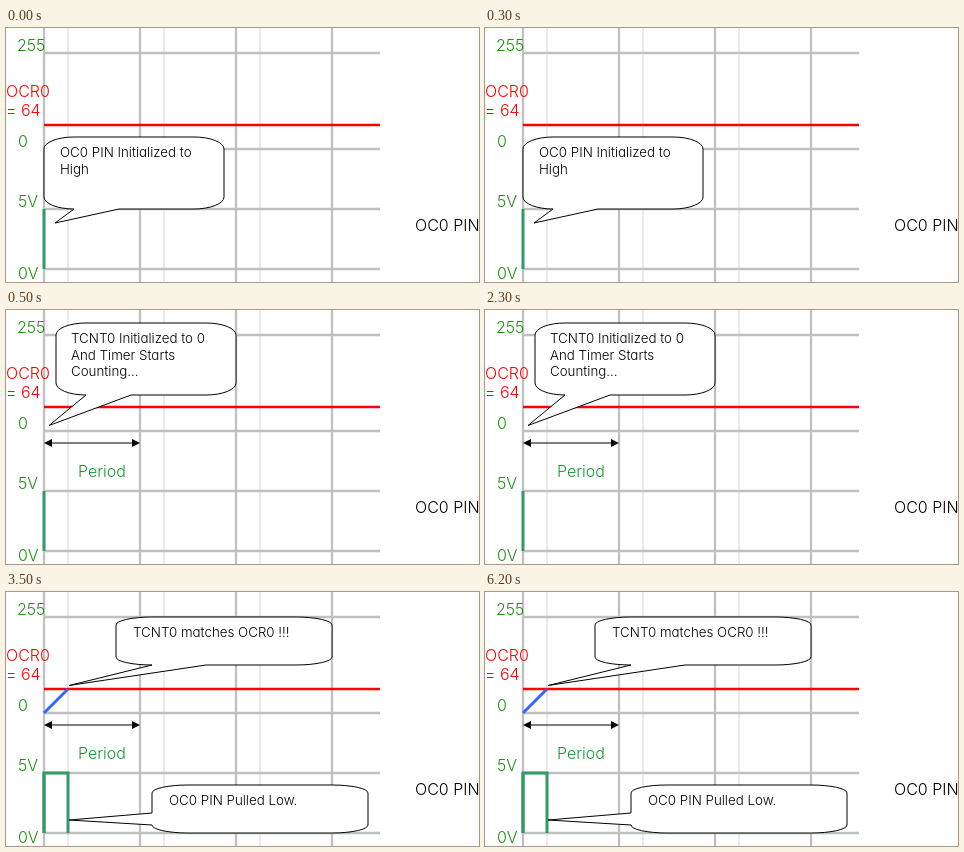
Recreate the animation shown at these times as an HTML page. Size 473 by 254 pixels, loop 8 s.

```html
<!DOCTYPE html>
<html lang="en">
<head>
<meta charset="utf-8">
<title>Timer compare match</title>
<style>
html, body { margin: 0; width: 100%; height: 100%; overflow: hidden; background: #fff; }
svg { display: block; width: 473px; height: 254px; }
text { font: 300 16px Inter, Lato, sans-serif; font-feature-settings: "cv11"; }
.axis { fill: #1f900f; }
.red { fill: #f00; }
.period { fill: #149a34; }
.note { font-size: 13.33px; }
.bubble { fill: #fff; stroke: #000; }
.signal { fill: none; stroke: #339966; stroke-width: 3; }
</style>
</head>
<body>
<svg id="stage" viewBox="0 0 473 254"></svg>
<script>
const LOOP = 8000;
const STEPS = { init: [0, 500], count: [500, 3500], match: [3500, 8000], period: [500, 8000] };

const stage = document.getElementById('stage');

function add(parent, tag, attrs, content = '') {
  const node = document.createElementNS('http://www.w3.org/2000/svg', tag);
  for (const [key, value] of Object.entries(attrs)) node.setAttribute(key, value);
  node.textContent = content;
  return parent.appendChild(node);
}
const line = (parent, d, stroke, width) =>
  add(parent, 'path', { d, stroke, 'stroke-width': width, fill: 'none' });
const label = (parent, x, y, content, cls = '') =>
  add(parent, 'text', { x, y, class: cls }, content);

// Rounded callout whose tail leaves the bottom or the left side.
function callout(parent, x, y, w, h, tip, side, rows) {
  const rx = w / 6, ry = h / 6;
  const tail = `L${tip}`;
  const bottom = side === 'bottom' ? `H${x + w * 5 / 12}${tail}L${x + rx},${y + h}` : `H${x + rx}`;
  const left = side === 'left' ? `V${y + h * 5 / 6}${tail}L${x},${y + h * 7 / 12}` : '';
  const arc = (dx, dy) => `a${rx},${ry} 0 0 1 ${dx},${dy}`;
  add(parent, 'path', {
    class: 'bubble',
    d: `M${x + rx},${y}H${x + w - rx}${arc(rx, ry)}V${y + h - ry}${arc(-rx, ry)}` +
       `${bottom}${arc(-rx, -ry)}${left}V${y + ry}${arc(rx, -ry)}Z`
  });
  for (const [tx, ty, content] of rows) label(parent, tx, ty, content, 'note');
}

// Grid and fixed labels
for (let i = 0; i < 3; i++) line(stage, `M${62 + i * 96},0V254`, '#e3e3e3', 1.5);
for (let i = 0; i < 4; i++) line(stage, `M${38 + i * 96},0V254`, '#c0c0c0', 2.3);
for (const y of [25, 121, 181, 241]) line(stage, `M38,${y}H374`, '#c0c0c0', 2.3);
line(stage, 'M38,97H374', '#f00', 2.3);
add(stage, 'path', { class: 'signal', d: 'M38,181V241' });
label(stage, 11, 23, '255', 'axis');
label(stage, 12, 119, '0', 'axis');
label(stage, 12, 179, '5V', 'axis');
label(stage, 12, 251, '0V', 'axis');
label(stage, 0, 69, 'OCR0', 'red');
label(stage, 0, 88, '= 64', 'red');
label(stage, 409, 203, 'OC0 PIN');

const groups = {};
for (const name of ['period', 'init', 'count', 'match']) groups[name] = add(stage, 'g', {});
const { period, init, count, match } = groups;

line(period, 'M42,133H130', '#000', 1);
add(period, 'path', { d: 'M38,133l8,-4v8ZM134,133l-8,-4v8Z' });
label(period, 72, 167, 'Period', 'period');

callout(init, 38, 109, 180, 72, '49,195', 'bottom', [
  [54, 129, 'OC0 PIN Initialized to'],
  [54, 146, 'High']
]);

callout(count, 50, 13, 180, 72, '43,115.5', 'bottom', [
  [65, 33, 'TCNT0 Initialized to 0'],
  [65, 50, 'And Timer Starts'],
  [65, 66, 'Counting…']
]);

add(match, 'path', { class: 'signal', d: 'M38,241V181H62V241' });
line(match, 'M38,121L62,97', '#3366ff', 3);
callout(match, 110, 25, 216, 48, '63,93.5', 'bottom', [
  [127, 45, 'TCNT0 matches OCR0 !!!']
]);
callout(match, 146, 193, 216, 48, '63,228', 'left', [
  [163, 213, 'OC0 PIN Pulled Low.']
]);

const start = performance.now();
function draw() {
  const t = (performance.now() - start) % LOOP;
  for (const [name, [from, to]] of Object.entries(STEPS))
    groups[name].style.display = t >= from && t < to ? '' : 'none';
  requestAnimationFrame(draw);
}
draw();
</script>
</body>
</html>
```
